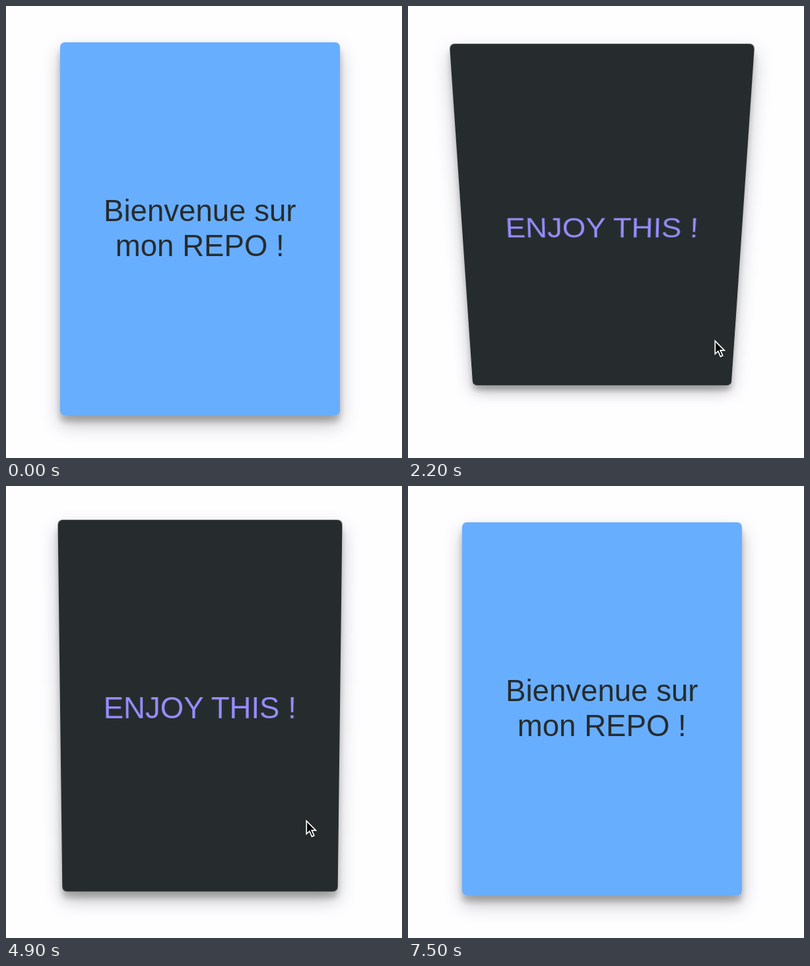
An HTML page that plays this animation: 600x685 px, repeating every 7.6 s.

```html
<!DOCTYPE html>
<html lang="fr">
<head>
<meta charset="utf-8">
<title>Carte à retourner</title>
<style>
  html, body { margin: 0; width: 100%; height: 100%; overflow: hidden; background: #fefdff; }
  .scene {
    position: absolute; left: 82px; top: 55px; width: 423.5px; height: 565px;
    perspective: 1412px;
  }
  .card, .face { position: absolute; inset: 0; }
  .card { transform-style: preserve-3d; }
  .face {
    display: flex; align-items: center; justify-content: center;
    text-align: center; white-space: nowrap;
    font: 45.6px/52.4px "Liberation Sans", Arial, sans-serif;
    border-radius: 7px;
    box-shadow: 0 14px 28px rgba(0, 0, 0, .25), 0 10px 10px rgba(0, 0, 0, .22);
    backface-visibility: hidden;
  }
  .front { background: #68aeff; color: #262c2e; }
  .back { background: #262c2e; color: #958dfb; transform: rotateX(180deg); }
  #cursor {
    position: absolute; left: 0; top: 0; width: 24px; height: 32px; overflow: visible;
    filter: drop-shadow(0 1px 1px rgba(0, 0, 0, .35));
  }
</style>
</head>
<body>
<div class="scene">
  <div class="card" id="card">
    <div class="face front"><span>Bienvenue sur<br>mon REPO !</span></div>
    <div class="face back"><span>ENJOY THIS !</span></div>
  </div>
</div>
<svg id="cursor" viewBox="0 0 24 32">
  <path d="M.3 1.6V21.4L4.9 17.1L8.5 25.3L11.8 23.9L8.3 15.9H14.4Z"
        fill="#000" stroke="#fff" stroke-width="1.7"/>
</svg>
<script>
const LOOP = 7600, TICK = 100, FLIP = 800, MOVE = 130;
const SHOW = 100, HIDE = 7000;
const card = document.getElementById('card');
const cursor = document.getElementById('cursor');

// The pointer crosses the card's edge at each time, by turns inwards and
// outwards, and comes to rest at x, y. Every crossing turns the card.
const entry = { x: 555, y: 522 };
const crossings = [
  { at: 224, x: 470, y: 506 },
  { at: 1000, x: 548, y: 516 },
  { at: 1744, x: 465, y: 506 },
  { at: 3214, x: 555, y: 530 },
  { at: 4265, x: 455, y: 506 },
  { at: 5372, x: 563, y: 517 }
];

const mix = (a, b, k) => a + (b - a) * k;
const clamp = k => Math.min(1, Math.max(0, k));
const smooth = k => k * k * (3 - 2 * k);

// The CSS "ease" curve, cubic-bezier(.25, .1, .25, 1)
function ease(x) {
  const bezier = (a, b, u) => 3 * a * u * (1 - u) ** 2 + 3 * b * u * u * (1 - u) + u ** 3;
  let lo = 0, hi = 1;
  for (let i = 0; i < 30; i++) {
    const mid = (lo + hi) / 2;
    if (bezier(.25, .25, mid) < x) lo = mid; else hi = mid;
  }
  return bezier(.1, 1, lo);
}

function poseAt(t) {
  let angle = 0, { x, y } = entry;
  crossings.forEach((c, i) => {
    const turn = ease(clamp((t - c.at) / FLIP));
    const move = smooth(clamp((t - c.at) / MOVE + .5));
    angle = mix(angle, i % 2 ? 0 : 180, turn);
    x = mix(x, c.x, move);
    y = mix(y, c.y, move);
  });
  return { angle, x, y };
}

function draw(t) {
  const { angle, x, y } = poseAt(t);
  card.style.transform = `rotateX(${angle}deg)`;
  cursor.style.transform = `translate(${x}px, ${y}px)`;
  cursor.style.visibility = t >= SHOW && t < HIDE ? 'visible' : 'hidden';
}

const begin = performance.now();
function loop() {
  // small lead so a tick is never shown late
  const t = performance.now() - begin + 20;
  draw(Math.floor(t / TICK) * TICK % LOOP);
  requestAnimationFrame(loop);
}
loop();
</script>
</body>
</html>
```
